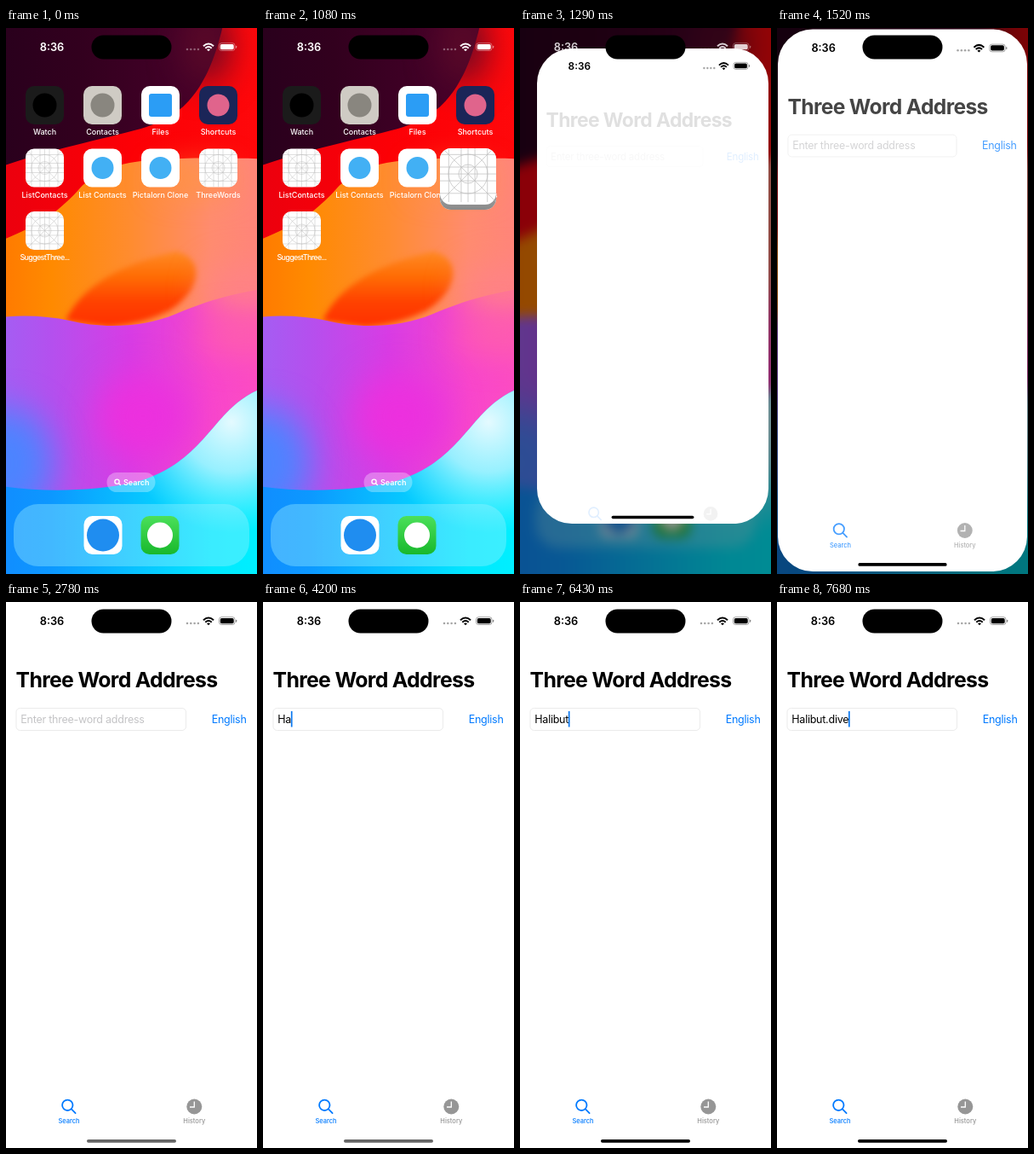
Write an HTML page that moves like this. It is 295 px wide and 640 px high and loops after 8 s.

```html
<!DOCTYPE html>
<html lang="en">
<head>
<meta charset="utf-8">
<style>
  html, body { margin: 0; width: 100%; height: 100%; overflow: hidden; background: #000; }
  svg { display: block; width: 295px; height: 640px; font-family: Inter, "Open Sans", sans-serif; }
  .label { font-size: 9px; font-weight: 500; fill: #fff; text-anchor: middle; }
  .field { font-size: 12.5px; letter-spacing: -.24px; }
  .tab { font-size: 7.5px; font-weight: 500; text-anchor: middle; }
  .soft { filter: blur(20px); }
</style>
</head>
<body>
<svg id="stage" viewBox="0 0 295 640"></svg>
<script>
const LOOP = 8000;
const stage = document.getElementById('stage');

const gradient = (id, vertical, ...colors) =>
  `<linearGradient id="${id}" ${vertical ? 'x2="0" y2="1"' : ''}>` +
  colors.map((c, i) => `<stop offset="${i / (colors.length - 1)}" stop-color="${c}"/>`).join('') +
  '</linearGradient>';

const blob = (x, y, rx, ry, color) =>
  `<ellipse class="soft" cx="${x}" cy="${y}" rx="${rx}" ry="${ry}" fill="${color}"/>`;

const tile = (x, y, fill, inner) =>
  `<g transform="translate(${x} ${y})"><rect width="45" height="45" rx="10" fill="${fill}"/>${inner}</g>`;
const disc = (r, color) => `<circle cx="22.5" cy="22.5" r="${r}" fill="${color}"/>`;
const label = (x, y, text, spacing = 0) =>
  `<text class="label" x="${x}" y="${y}" letter-spacing="${spacing}">${text}</text>`;

const blueprint = `<g fill="none" stroke="#bdbdbd" stroke-width=".5">
  <path d="M0 0L45 45M45 0L0 45M7 0V45M17 0V45M22.5 0V45M28 0V45M38 0V45
    M0 7H45M0 17H45M0 22.5H45M0 28H45M0 38H45"/>
  <circle cx="22.5" cy="22.5" r="15.7"/><circle cx="22.5" cy="22.5" r="7.5"/></g>`;
const clippedBlueprint = `<g clip-path="url(#tileClip)">${blueprint}</g>`;

const apps = [
  ['Watch', '#1b1b1b', disc(14, '#000')],
  ['Contacts', '#cfcbc4', disc(14, '#89867f')],
  ['Files', '#fff', '<rect x="9" y="9" width="27" height="27" rx="3" fill="#2b9df5"/>'],
  ['Shortcuts', '#1b2558', disc(13, '#e0648c')],
  ['ListContacts', '#fff', clippedBlueprint],
  ['List Contacts', '#fff', disc(13, '#42b0f4')],
  ['Pictalorn Clone', '#fff', disc(13, '#42b0f4')],
  ['ThreeWords', '#fff', clippedBlueprint],
  ['SuggestThree...', '#fff', clippedBlueprint, -.7],
];
const appGrid = apps.map(([name, fill, inner, spacing], i) => {
  const x = 23 + 68 * (i % 4), y = 68 + 73.5 * Math.floor(i / 4);
  return tile(x, y, fill, inner) + label(x + 22.5, y + 57, name, spacing);
}).join('');

const shore = 'M-40 530C20 545 90 545 150 533C235 510 240 450 295 425L335 405V690H-40Z';
const wallpaper = `
  <rect x="-40" y="-40" width="375" height="720" fill="url(#night)"/>
  <path d="M-40 176C30 145 120 130 165 116S245 70 262 -40H335V300H-40Z" fill="url(#red)"/>
  ${blob(235, 20, 26, 45, '#5c0a28')}
  <path d="M-40 262C20 240 50 228 85 190S160 150 335 154V480H-40Z" fill="url(#orange)"/>
  ${blob(225, 178, 45, 10, '#ff9a2c')}
  <path d="M70 343C90 300 140 275 200 262C235 270 230 310 190 332Q160 347 120 350Z"
    fill="url(#hollow)" style="filter:blur(3px)"/>
  <path d="M-40 345C0 335 40 336 75 343C110 352 160 352 200 335S270 310 335 300V600H-40Z" fill="url(#violet)"/>
  ${blob(282, 308, 50, 28, '#ff8288')}
  ${blob(275, 362, 50, 18, '#ff62a8')}
  ${blob(161, 455, 55, 50, '#ec30de')}
  ${blob(0, 510, 55, 65, '#4c84ff')}
  <path d="${shore}" fill="url(#sea)"/>
  <path d="${shore}" fill="url(#foam)"/>`;

const statusBar = `
  <text x="54" y="26.7" font-size="12.8" font-weight="600" text-anchor="middle">8:36</text>
  <g opacity=".35">${[213, 217.3, 221.6, 225.9].map(x => `<circle cx="${x}" cy="25" r="1.3"/>`).join('')}</g>
  <g fill="none" stroke="currentColor" stroke-width="2">
    <path d="M232 21.3Q238 15.7 244 21.3M234.3 23.7Q238 20.3 241.7 23.7"/>
    <rect x="250.5" y="17.7" width="18.5" height="8.8" rx="2.8" stroke-width=".8" opacity=".45"/>
  </g>
  <path d="M236 25.3Q238 23.5 240 25.3L238 27.3Z"/>
  <rect x="251.8" y="19" width="15.9" height="6.2" rx="1.7"/>
  <rect x="270" y="20.7" width="1.2" height="3" rx=".6" opacity=".5"/>`;

stage.innerHTML = `
  <defs>
    ${gradient('night', false, '#26001c', '#32001e', '#440028', '#4c0028')}
    ${gradient('red', false, '#e80010', '#fc0006', '#ff0a0c')}
    ${gradient('orange', false, '#ff7000', '#ff8a00', '#ff8c30', '#ff8c70', '#ff8080')}
    ${gradient('hollow', true, '#ff8a24', '#ff6c04', '#ff4200', '#ff3000')}
    ${gradient('violet', false, '#9a66f6', '#b450ee', '#d83ce4', '#f846cc', '#ff50bc')}
    ${gradient('sea', false, '#1486ff', '#0c98ff', '#08c0ff', '#00e8ff', '#00f4ff')}
    ${gradient('mint', true, '#4be05a', '#18b82c')}
    ${gradient('edge', true, '#ddd', '#888')}
    <radialGradient id="foam" gradientUnits="userSpaceOnUse" cx="265" cy="462" r="130">
      <stop stop-color="#e4faff"/><stop offset=".45" stop-color="#bdf2ff" stop-opacity=".8"/>
      <stop offset="1" stop-color="#80eaff" stop-opacity="0"/>
    </radialGradient>
    <clipPath id="tileClip"><rect width="45" height="45" rx="10"/></clipPath>
    <clipPath id="windowClip"><rect id="frame"/></clipPath>
  </defs>

  <g id="home">
    ${wallpaper}
    <g id="icons">
      ${appGrid}
      <rect x="118.5" y="521" width="57" height="23" rx="11.5" fill="#fff" opacity=".3"/>
      <g fill="none" stroke="#fff" stroke-width="1.3"><circle cx="130.5" cy="531.8" r="2.6"/><path d="M132.5 533.8L134.8 536"/></g>
      <text x="138" y="536" font-size="9" font-weight="600" fill="#fff">Search</text>
      <rect x="9" y="558" width="277" height="73" rx="29" fill="#a0f0ff" opacity=".36"/>
      ${tile(91.5, 572, '#fff', disc(19, '#1f8df0'))}
      ${tile(158.5, 572, 'url(#mint)', disc(15, '#fff'))}
    </g>
  </g>
  <rect id="dim" width="295" height="640"/>
  <g id="homeStatus" fill="#fff" color="#fff">${statusBar}</g>

  <g id="window" clip-path="url(#windowClip)">
    <rect width="295" height="640" fill="#fff"/>
    <g id="page">
      <g color="#000">${statusBar}</g>
      <g id="content">
        <text x="11.5" y="100.3" font-size="24.8" font-weight="700" letter-spacing="-.66">Three Word Address</text>
        <rect x="12" y="124.5" width="199.5" height="26" rx="4.5" fill="none" stroke="#ebebeb"/>
        <text id="hint" class="field" x="17.3" y="141.8" fill="#c4c4c6">Enter three-word address</text>
        <text id="typed" class="field" x="17.3" y="141.8"></text>
        <rect id="caret" y="128" width="1.7" height="18.5" fill="#0a78f0"/>
        <text class="field" x="241.7" y="141.8" fill="#007aff">English</text>
        <g fill="none" stroke="#007aff" stroke-width="1.8" stroke-linecap="round">
          <circle cx="72.3" cy="589.8" r="6.2"/><path d="M76.9 594.4L81.6 599.2"/>
        </g>
        <text class="tab" x="74" y="611.2" fill="#007aff">Search</text>
        <circle cx="221.3" cy="591.5" r="9" fill="#969696"/>
        <path d="M221.3 585.5V592H216" fill="none" stroke="#fff" stroke-width="1.3"/>
        <text class="tab" x="221.3" y="611.2" fill="#969696">History</text>
      </g>
    </g>
    <g id="bottom"><rect id="indicator" x="95" y="-10" width="105" height="3.7" rx="1.85"/></g>
    <g id="launchIcon">
      <rect width="45" height="50" fill="url(#edge)"/>
      <rect y="-10" width="45" height="55" rx="9" fill="#fff"/>
      <g transform="translate(0 -2)">${blueprint}</g>
    </g>
  </g>
  <rect x="100.5" y="8.5" width="94" height="28" rx="14"/>`;

const el = Object.fromEntries([...stage.querySelectorAll('[id]')].map(e => [e.id, e]));
const set = (node, attrs) => { for (const k in attrs) node.setAttribute(k, attrs[k]); };
const show = (node, on) => node.setAttribute('visibility', on ? 'inherit' : 'hidden');

// Window opening: start, x, y, width, height, corner, dim, blur, icon scale, content opacity
const opening = [
  [1080, 208, 141, 66, 72, 13, 0, 0, 1, 0],
  [1180, 72, 77, 215.5, 388, 40, .33, 3.5, .957, 0],
  [1290, 20, 24, 272, 557, 41, .42, 7, .93, .12],
  [1410, 5, 6, 289, 617, 41, .48, 9, .91, .45],
  [1520, 1, 1.5, 293, 635.5, 41, .5, 10, .9, .73],
  [1640, 0, .3, 295, 639.5, 41, .5, 10, .9, .9],
  [1750, 0, 0, 295, 640, 0, .5, 10, .9, 1],
];
const address = 'Halibut.dive';
const keyTimes = [3460, 4200, 4500, 4730, 5580, 6020, 6430, 6810, 7080, 7320, 7540, 7680];
const indicatorColor = t => t < 1290 ? '#b0b0b0' : t >= 1750 && t < 4730 ? '#666' : '#000';

function draw(t) {
  const pose = opening.findLast(p => p[0] <= t);
  show(el.window, pose);
  const [, x, y, width, height, rx, dim, blur, iconScale, opacity] = pose || [0, 0, 0, 0, 0, 0, 0, 0, 1, 0];
  show(el.home, t < 1750);
  el.home.style.filter = blur ? `blur(${blur}px)` : 'none';
  set(el.icons, { transform: `translate(147.5 320) scale(${iconScale}) translate(-147.5 -320)` });
  set(el.dim, { opacity: dim });
  set(el.homeStatus, { opacity: dim ? .82 : 1 });
  if (!pose) return;

  const scale = width / 295;
  set(el.frame, { x, y, width, height, rx });
  set(el.page, { transform: `translate(${x} ${y}) scale(${scale})` });
  set(el.bottom, { transform: `translate(${x} ${y + height}) scale(${scale})` });
  set(el.indicator, { fill: indicatorColor(t) });
  set(el.launchIcon, { transform: `translate(${x} ${y}) scale(${width / 45})` });
  show(el.launchIcon, t < 1180);
  set(el.content, { opacity });

  const count = keyTimes.filter(k => k <= t).length;
  el.typed.textContent = address.slice(0, count);
  show(el.hint, !count);
  show(el.caret, t >= 2910);
  set(el.caret, { x: 17 + (count ? el.typed.getComputedTextLength() : 0) });
}

function tick() {
  draw(performance.now() % LOOP);
  requestAnimationFrame(tick);
}
tick();
</script>
</body>
</html>
```
